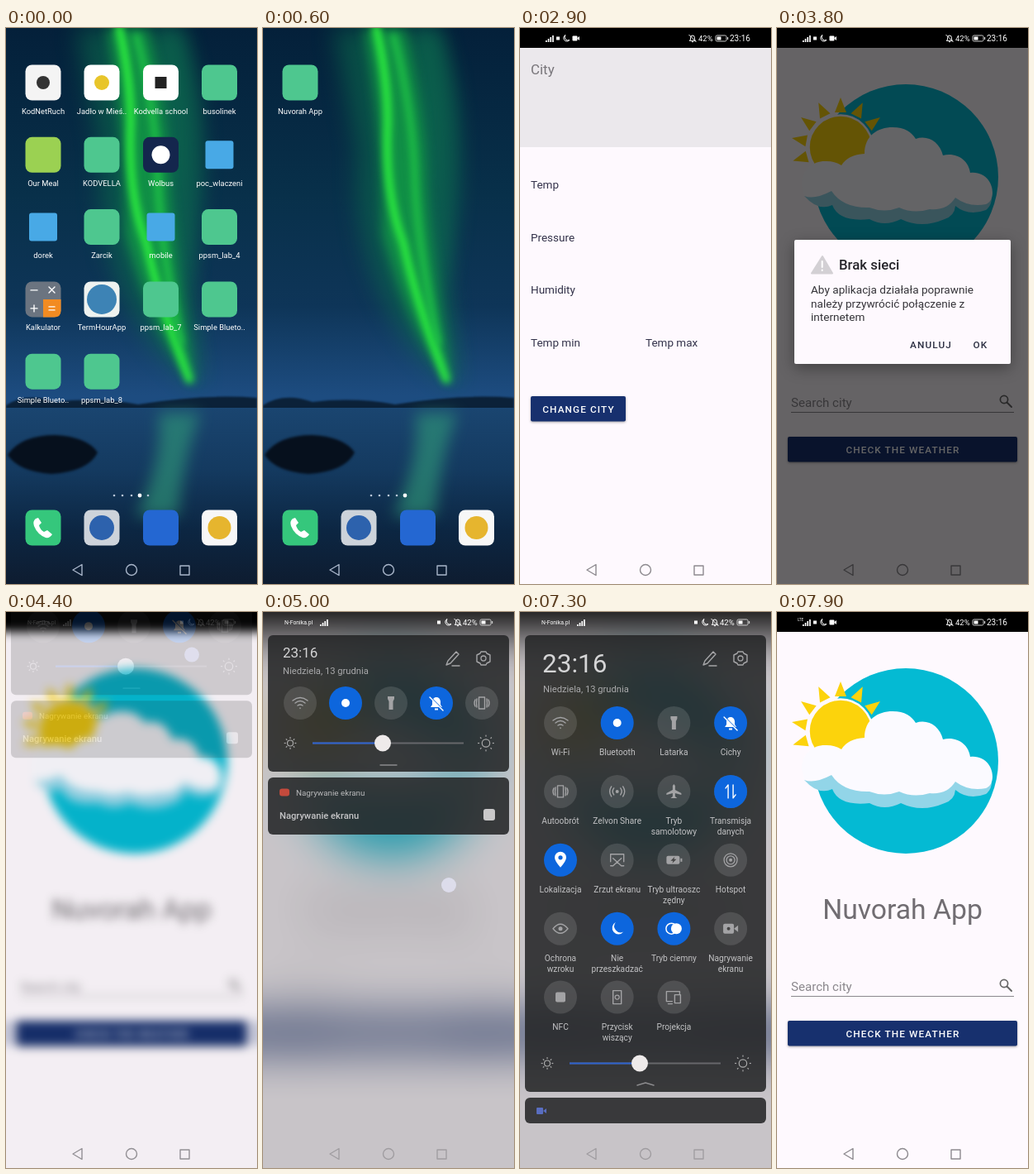
An HTML page that plays this animation: 304 px wide and 672 px high, repeating every 8000 ms.

```html
<!DOCTYPE html>
<html lang="pl">
<head>
<meta charset="utf-8">
<style>
  html, body { margin: 0; width: 100%; height: 100%; overflow: hidden; background: #000; }
  svg { display: block; width: 304px; height: 672px; font-family: Roboto, sans-serif; }
  .mid { text-anchor: middle; }
  .bold { font-weight: 500; }
  .caps { font-weight: 500; letter-spacing: 1.1px; }
  .line { fill: none; stroke-width: 1.4; stroke-linejoin: round; stroke-linecap: round; }
  .shadow { filter: drop-shadow(0 5px 9px rgba(0,0,0,.35)); }
</style>
</head>
<body>
<svg id="stage" viewBox="0 0 304 672"></svg>
<script>
const LOOP = 8000, STEP = 100;
const $ = id => document.getElementById(id);
const paper = '#fef9fe';

// Markup helpers
const text = (x, y, size, fill, str, cls = '') =>
  `<text x="${x}" y="${y}" font-size="${size}" fill="${fill}" class="${cls}">${str}</text>`;
const rect = (x, y, w, h, fill, rx = 0, more = '') =>
  `<rect x="${x}" y="${y}" width="${w}" height="${h}" rx="${rx}" fill="${fill}" ${more}/>`;
const circle = (x, y, r, fill, more = '') =>
  `<circle cx="${x}" cy="${y}" r="${r}" fill="${fill}" ${more}/>`;
const path = (d, fill, more = '') => `<path d="${d}" fill="${fill}" ${more}/>`;
const line = (d, color, more = '') => `<path d="${d}" class="line" stroke="${color}" ${more}/>`;
const group = (id, body, more = '') => `<g id="${id}" ${more}>${body}</g>`;
const at = (x, y, body) => `<g transform="translate(${x} ${y})">${body}</g>`;
const blur = px => `style="filter:blur(${px}px)"`;
const glow = (d, color, width, px) => line(d, color, `style="stroke-width:${width};filter:blur(${px}px)"`);

// Home screen
const tile = (fill, mark = '') => rect(-21.5, -21.5, 43, 43, fill, 8) + mark;
const green = tile('#4ec78f'), blueMark = rect(-17, -17, 34, 34, '#48a9e6', 3);
const calculator = tile('#6b7480') + path('M0 0H21.5V13.5Q21.5 21.5 13.5 21.5H0Z', '#f28b22') +
  line('M-15-11H-7M7-15L14-8M14-15L7-8M-15 11H-7M-11 7V15M7 9H14M7 13H14', '#fff');
const apps = [
  ['KodNetRuch', tile('#f4f4f4', circle(0, 0, 8, '#333'))],
  ['Jadło w Mieś..', tile('#fff', circle(0, 0, 9, '#e8c52a'))],
  ['Kodvella school', tile('#fff', rect(-7, -7, 14, 14, '#222'))],
  ['busolinek', green],
  ['Our Meal', tile('#9bd152')],
  ['KODVELLA', green],
  ['Wolbus', tile('#14264d', circle(0, 0, 11, '#fff'))],
  ['poc_wlaczeni', blueMark],
  ['dorek', blueMark], ['Zarcik', green], ['mobile', blueMark], ['ppsm_lab_4', green],
  ['Kalkulator', calculator],
  ['TermHourApp', tile('#eef2f0', circle(0, 0, 18, '#3d83b5'))],
  ['ppsm_lab_7', green], ['Simple Blueto..', green],
  ['Simple Blueto..', green], ['ppsm_lab_8', green]
];
const columns = [45, 116, 187.5, 258.5];
const launcher = ([name, icon], i) =>
  at(columns[i % 4], 66 + 87.3 * (i >> 2), icon + text(0, 37.5, 9.4, '#fff', name, 'mid'));
const handset = path('M-9-11Q-13-8-11-2Q-7 8 3 12Q8 13 11 8L5 3L1 5Q-4 2-5-3L-2-6L-6-12Z', '#fff');
const dock = [
  tile('#35c77c', handset), tile('#cdd3da', circle(0, 0, 15, '#2d62ad')),
  tile('#2467d2'), tile('#f7f7f7', circle(0, 0, 14, '#e6b52e'))
];

const gradient = (id, stops) => `<linearGradient id="${id}" x2="0" y2="1">${stops.map(([offset, color]) =>
  `<stop offset="${offset}" stop-color="${color}"/>`).join('')}</linearGradient>`;
const wallpaper =
  rect(0, 0, 304, 672, 'url(#sky)') +
  path('M85 0H205Q225 100 210 210L235 435L185 390Q105 290 115 150Z', '#0b6b4c', 'opacity=".6" ' + blur(14)) +
  path('M185 0H215Q262 130 220 320L238 432Q192 300 190 150Z', '#0d6f50', 'opacity=".6" ' + blur(11)) +
  path('M122 0H172Q198 110 198 190Q206 300 230 432Q182 380 145 250Q146 120 122 0Z', '#14a945', 'opacity=".7" ' + blur(7)) +
  glow('M137 0Q151 60 151 115Q147 200 170 260Q185 330 222 425', '#2cf03e', 9, 4) +
  glow('M158 10Q182 100 184 190Q188 270 212 380', '#1fc446', 7, 4) +
  path('M0 456Q25 440 60 452Q110 446 160 455Q240 442 304 447V462H0Z', '#0b2138', blur(1)) +
  rect(0, 459, 304, 213, 'url(#water)') +
  path('M185 465H235Q215 520 208 590H158Q192 520 185 465Z', '#2f9678', 'opacity=".65" ' + blur(9)) +
  path('M2 516Q18 492 60 492Q98 494 111 513Q100 536 55 539Q15 536 2 516Z', '#06101d', blur(1.5));

const home = wallpaper +
  group('pages', apps.map(launcher).join('') + at(304, 0, launcher(['Nuvorah App', green], 0))) +
  [131, 141, 152, 162, 172].map(x => circle(x, 565, 1.3, '#b8c6d8')).join('') +
  circle(162, 565, 2.4, '#fff', 'id="pageDot"') +
  dock.map((icon, i) => at(columns[i], 604, icon)).join('');

// App screens
const rays = [-4, -3, -2, -1, 0, 1, 2].map(i =>
  path('M-7-42L0-60L7-42Z', '#fcd30c', `transform="translate(77 144) rotate(${i * 26.5})"`)).join('');
const artwork = circle(156, 180, 112, '#04bad3') + rays +
  circle(77, 144, 38.5, '#fcd30c', `stroke="${paper}" stroke-width="2.5"`) +
  path('M33 203Q50 222 67 214Q75 235 112 231Q130 241 150 231Q175 243 203 231Q215 227 216 215Q232 228 253 220Q260 215 260 205L200 190H60Z', '#92d5e8') +
  path('M30 190C30 170 45 160 60 161Q70 161 78 166Q86 153 106 152C106 130 122 120 140 120C155 120 163 126 168 134C183 129 197 138 201 154C218 150 232 160 234 175C250 173 261 185 261 199C261 206 258 211 253 213Q232 217 216 205Q206 221 185 219Q165 225 148 217Q130 224 112 217Q80 218 66 197Q45 208 33 203Z', '#fbfaff');
const button = (x, y, w, label) =>
  rect(x, y, w, 30.5, '#17306e', 2, 'style="filter:drop-shadow(0 1.5px 1.5px rgba(0,0,0,.35))"') +
  text(x + w / 2 + .5, y + 19.7, 11.8, '#fff', label, 'mid caps');
const mainPage = artwork +
  text(152, 371, 33.7, '#716d72', 'Nuvorah App', 'mid') +
  text(17, 457.5, 15.1, '#8b888d', 'Search city') +
  rect(17, 464, 270, 1, '#8b888d') +
  line('M278.5 452.5L284 458', '#666', 'style="stroke-width:2"') +
  circle(275, 449, 4.6, 'none', 'stroke="#666" stroke-width="1.7"') +
  button(13, 494, 278, 'CHECK THE WEATHER');
const fields = [[13, 194, 'Temp'], [13, 258, 'Pressure'], [13, 321, 'Humidity'], [13, 384.5, 'Temp min'], [152, 384.5, 'Temp max']];
const cityPage = rect(0, 24, 304, 648, paper) + rect(0, 24, 304, 120, '#ebe8ec') +
  text(13, 56, 16.9, '#79767b', 'City') +
  fields.map(([x, y, name]) => text(x, y, 13.5, '#33324a', name)).join('') +
  button(13, 445, 115, 'CHANGE CITY');

const dialog = rect(21, 256, 262, 150, paper, 2, 'class="shadow"') +
  path('M55 276L67 296.5H42Z', '#d3d0d4', 'stroke="#d3d0d4" stroke-width="2" stroke-linejoin="round"') +
  line('M54.7 282V289M54.7 292.5V293', '#fff', 'style="stroke-width:2"') +
  text(75, 292, 16.8, '#252429', 'Brak sieci', 'bold') +
  ['Aby aplikacja działała poprawnie', 'należy przywrócić połączenie z', 'internetem']
    .map((row, i) => text(41, 321 + i * 16.5, 13.6, '#353439', row)).join('') +
  text(161, 386.5, 11.8, '#2c3042', 'ANULUJ', 'caps') + text(237.5, 386.5, 11.8, '#2c3042', 'OK', 'caps');

// Status bar
const moonShape = 'M-1-4A4 4 0 1 0 4 2A4 4 0 0 1-1-4Z';
const bellShape = 'M-5 4H5L3.5 2V-1Q3.5-5 0-5Q-3.5-5-3.5-1V2ZM-1 6H1';
const signal = [0, 1, 2, 3].map(i => rect(i * 2.7, 6 - i * 2, 1.7, 2 + i * 2, '#fff')).join('');
const mutedBell = `<g transform="scale(.7)">${line(bellShape + 'M-6-6L6 6', '#fff')}</g>`;
const battery = rect(0, -3.5, 13, 7, 'none', 1.5, 'stroke="#ccc"') + rect(1.5, -2, 5, 4, '#fff') + rect(14, -1.5, 1.2, 3, '#ccc');
const moon = path(moonShape, 'none', 'stroke="#fff"');
const smallMark = rect(-2, -2, 4, 4, '#fff');
const appStatus = at(31, 9, signal) + at(46, 12.5, smallMark) + at(56, 12.5, moon) +
  rect(63.5, 9.5, 6, 6, '#fff', 1) + path('M69 12.5L72 10V15Z', '#fff') +
  at(209, 12.5, mutedBell) + text(216, 16.3, 9.5, '#fff', '42%') + at(237, 12.5, battery) +
  text(254, 16.3, 10, '#fff', '23:16') + group('lte', text(25, 11, 4.5, '#fff', 'LTE'));
const shadeStatus = text(26, 15, 6.8, '#fff', 'N-Fonika.pl') + at(69, 9, signal) + at(213, 12.5, smallMark) +
  at(224, 12.5, moon) + at(236, 12.5, mutedBell) + text(242, 16.3, 9.5, '#fff', '42%') + at(263, 12.5, battery);

// Quick settings: label, icon, compact column, active
const rings = (r, color) => circle(0, 0, r, 'none', `stroke="${color}" stroke-width="1.3"`);
const stroke = d => c => line(d, c), solid = d => c => path(d, c);
const toggles = [
  ['Wi-Fi', stroke('M-9-3Q0-10 9-3M-6 0Q0-5 6 0M-3 3Q0 1 3 3M0 6V6.5'), 0],
  ['Bluetooth', c => circle(0, 0, 5, c), 1, true],
  ['Latarka', solid('M-4-8H4V-5L2.500-2V8H-2.500V-2L-4-5Z'), 2],
  ['Cichy', c => path('M-7 5H7L5 2V-2Q4-7 0-7Q-4-7-5-2V2ZM-2 6.500H2V8.500H-2Z', c) +
    line('M-7-7L9 9', '#0d66dd') + line('M-8-7L8 9', c), 3, true],
  ['Autoobrót', stroke('M-3.5-7H3.5V7H-3.5ZM-6-5Q-7 0-6 5M6-5Q7 0 6 5M-8-4Q-10 0-8 4M8-4Q10 0 8 4'), 4],
  ['Zelvon Share', c => circle(0, 0, 2, c) + line('M-4-4Q-7 0-4 4M4-4Q7 0 4 4M-7-6Q-11 0-7 6M7-6Q11 0 7 6', c)],
  ['Tryb|samolotowy', solid('M0-9L1.5-7V-2L9 2V4L1.5 2V6L4 8H-4L-1.5 6V2L-9 4V2L-1.5-2V-7Z')],
  ['Transmisja|danych', stroke('M-3 8V-8L-6-4M3-8V8L6 4')],
  ['Lokalizacja', c => path('M0 9Q-7 1-7-3A7 7 0 0 1 7-3Q7 1 0 9Z', c) + circle(0, -3, 2.6, '#0d66dd'), , true],
  ['Zrzut ekranu', stroke('M-8 2V-7H8V2M-5-2L5 7M5-2L-5 7M-8 7H-6M6 7H8')],
  ['Tryb ultraoszc|zędny', c => rect(-9, -5, 16, 10, c, 2) + rect(8, -2, 2, 4, c) + path('M1-4L-4 1H-1L-2 4L3-1H0Z', '#444')],
  ['Hotspot', c => circle(0, 0, 2, c) + rings(5, c) + rings(8, c)],
  ['Ochrona|wzroku', c => line('M-9 0Q0-11 9 0Q0 11-9 0Z', c) + circle(0, 0, 2.5, c)],
  ['Nie|przeszkadzać', c => `<g transform="scale(1.9)">${path(moonShape, c)}</g>`, , true],
  ['Tryb ciemny', c => circle(3, 0, 6.5, c) + circle(-3, 0, 6.5, 'none', `stroke="${c}" stroke-width="1.5"`), , true],
  ['Nagrywanie|ekranu', c => rect(-9, -6, 13, 12, c, 2) + path('M4 0L9-4V4Z', c) + circle(-2.5, 0, 2, '#444')],
  ['NFC', c => rect(-6, -6, 12, 12, c, 2)],
  ['Przycisk|wiszący', c => line('M-5-8H5V8H-5Z', c) + rings(2.5, c)],
  ['Projekcja', stroke('M-2 5H-9V-7H7V-4M1-3H8V7H1ZM-7 8H-2')]
];
const toggleMark = ([label, icon, , on], i) => group('toggle' + i,
  circle(0, 0, 20, on ? '#0d66dd' : '#fff', on ? '' : 'fill-opacity=".12"') + icon(on ? '#fff' : '#a3a3a5') +
  (i === 7 ? group('dataOn', circle(0, 0, 20, '#0d66dd') + icon('#fff')) : '') +
  `<g class="label">${label.split('|').map((row, n) => text(0, 39.3 + n * 13, 10.2, '#c2c2c4', row, 'mid')).join('')}</g>`);
const sun = r => circle(0, 0, r, 'none', 'stroke="#aaa" stroke-width="1.2"') +
  [0, 1, 2, 3, 4, 5, 6, 7].map(i => rect(-.6, -r * 2.1, 1.2, 2, '#aaa', 0, `transform="rotate(${i * 45})"`)).join('');
const card = 'rgba(36,37,38,.87)';
const shade =
  rect(6, 28, 292, 165, card, 6, 'id="panel"') +
  text(24, 55, 17, '#d5d5d6', '23:16').replace('<text', '<text id="clock"') +
  group('date', text(0, 0, 11.2, '#a9a9ab', 'Niedziela, 13 grudnia')) +
  line('M222 64L224 59L234 48L237 51L227 62ZM229 65H238', '#a5a5a7') +
  at(267, 56, rings(3, '#a5a5a7') + line('M-3-8H3L4-6L8-4V4L4 6L3 8H-3L-4 6L-8 4V-4L-4-6Z', '#a5a5a7')) +
  toggles.map(toggleMark).join('') +
  group('slider', at(33, 0, sun(3.5)) + at(270, 0, sun(4.7)) + rect(60, -1, 183, 2, '#66676b') +
    rect(60, -1, 85, 2, '#2c60cc') + circle(145, 0, 10, '#eeeaea')) +
  line('', '#8b8b8d', 'id="handle"') +
  group('notice', rect(6, 0, 292, 69, card, 6, 'id="noticeCard"') +
    group('noticeRed', rect(20, 13.5, 12, 9, '#c44a3c', 3)) +
    group('noticeBlue', rect(20, 12, 8, 8, '#596dc0', 1) + path('M28 16L32 13V19Z', '#596dc0')) +
    group('noticeText', text(40, 22, 9.8, '#b9b9bb', 'Nagrywanie ekranu') +
      text(20, 49.5, 11.2, '#c4c4c6', 'Nagrywanie ekranu', 'bold') + rect(267, 38, 14, 14, '#c9c8c9', 3)));

$('stage').innerHTML = `<defs>
  ${gradient('sky', [[0, '#04203a'], [.3, '#08304a'], [.5, '#0e3558'], [.66, '#1d4c80'], [1, '#1d4c80']])}
  ${gradient('water', [[0, '#1a4570'], [.35, '#143a60'], [.7, '#0c2642'], [1, '#0e1c30']])}</defs>` +
  group('home', home) +
  group('app', rect(-80, 24, 464, 740, paper, 0, 'id="bleed"') + rect(0, 0, 304, 672, paper) +
    rect(-80, 494, 464, 30, '#17306e', 0, 'id="buttonBleed"') +
    group('main', mainPage) + group('city', cityPage) + rect(-80, -80, 464, 104, '#000', 0, 'id="statusBack"')) +
  group('nav', line('M92 648.5V661.5L81 655ZM211 650H222V661H211Z', 'currentColor') +
    circle(152, 655, 6.5, 'none', 'stroke="currentColor" stroke-width="1.4"')) +
  rect(0, 0, 304, 672, '#000', 0, 'id="dim"') + group('dialog', dialog) +
  group('appStatus', appStatus) + group('shadeStatus', shadeStatus) +
  group('shade', shade) + circle(0, 0, 9, '#e2e2f2', 'id="touch"');

const show = (id, amount) => {
  const { style } = $(id);
  style.display = amount > 0 ? '' : 'none';
  style.opacity = amount;
};
const set = (id, values) => { for (const key in values) $(id).setAttribute(key, values[key]); };
const move = (id, x, y) => set(id, { transform: `translate(${x} ${y})` });
const mix = (a, b, k) => a + (b - a) * k;

function drawShade(pull, expand, dataOn) {
  const bottom = mix(193, 580, expand);
  const details = Math.max(0, expand * 2 - 1);
  show('shade', pull);
  move('shade', 0, (pull - 1) * bottom * .6);
  set('panel', { height: bottom - 28 });
  set('clock', { x: mix(24, 27, expand), y: mix(55, 72.5, expand), 'font-size': mix(17, 31.5, expand) });
  move('date', mix(24, 28, expand), mix(75, 96.5, expand));
  toggles.forEach(([, , slot], i) => {
    const x = 49 + 68.7 * (i % 4), y = 134 + 82.9 * (i >> 2);
    const compact = slot !== undefined;
    move('toggle' + i, compact ? mix(45 + 55 * slot, x, expand) : x,
      compact ? mix(110, y, expand) : y - 60 * (1 - expand));
    if (!compact) show('toggle' + i, details);
    $('toggle' + i).querySelector('.label').style.opacity = details;
  });
  show('dataOn', dataOn);
  move('slider', 0, bottom - 34.5);
  set('handle', { d: `M142 ${bottom - 8}L152 ${bottom - 8 - 3 * expand}L162 ${bottom - 8}` });
  move('notice', 0, bottom + 7);
  set('noticeCard', { height: mix(69, 31, expand) });
  show('noticeText', 1 - expand);
  show('noticeRed', 1 - expand);
  show('noticeBlue', expand);
}

function draw(t) {
  const ramp = (a, b) => {
    const k = Math.min(1, Math.max(0, (t - a) / (b - a)));
    return k * k * (3 - 2 * k);
  };
  const swipe = ramp(0, 500), open = ramp(700, 1200);
  const city = ramp(2200, 2900) * (1 - ramp(3100, 3600));
  const closeFirst = 1 - ramp(1900, 2100), again = ramp(3400, 3700) * (1 - ramp(4000, 4200));
  const pull = ramp(4200, 4900) * (1 - ramp(7600, 7900));

  show('home', open < 1 ? 1 : 0);
  move('pages', -304 * swipe, 0);
  set('pageDot', { cx: 162 + 10 * swipe });

  const scale = mix(.3, 1, open);
  show('app', Math.min(1, open * 2));
  set('app', { transform: `translate(${152 * (1 - scale)} ${336 * (1 - scale)}) scale(${scale})` });
  show('bleed', open === 1 ? 1 : 0);
  show('buttonBleed', pull);
  show('statusBack', open === 1 ? 1 : 0);
  show('main', ramp(1500, 1600));
  show('city', city > 0 ? 1 : 0);
  move('city', 304 * (1 - city), 0);
  $('app').style.filter = pull > 0 ? `blur(${29 * pull}px)` : '';

  $('nav').style.color = open > .5 ? '#8d8a8f' : '#a9b6ca';
  show('nav', 1 - .55 * pull);
  show('dim', .6 * (ramp(1440, 1700) * closeFirst + again) + .21 * pull);
  show('dialog', ramp(1300, 1500) * closeFirst + again);
  show('appStatus', open === 1 && pull === 0 ? 1 : 0);
  show('lte', t >= 7000 ? 1 : 0);
  show('shadeStatus', pull);
  drawShade(pull, ramp(5000, 5700), ramp(6400, 6600));

  const tapping = t >= 6400 && t < 6700;
  show('touch', (t >= 4300 && t < 5600) || tapping ? .85 : 0);
  move('touch', tapping ? 255 : 225, tapping ? 217 : 330 * ramp(4200, 5000) + 230 * ramp(5000, 5600));
}

function frame() {
  draw(Math.floor(performance.now() % LOOP / STEP) * STEP);
  requestAnimationFrame(frame);
}
frame();
</script>
</body>
</html>
```
